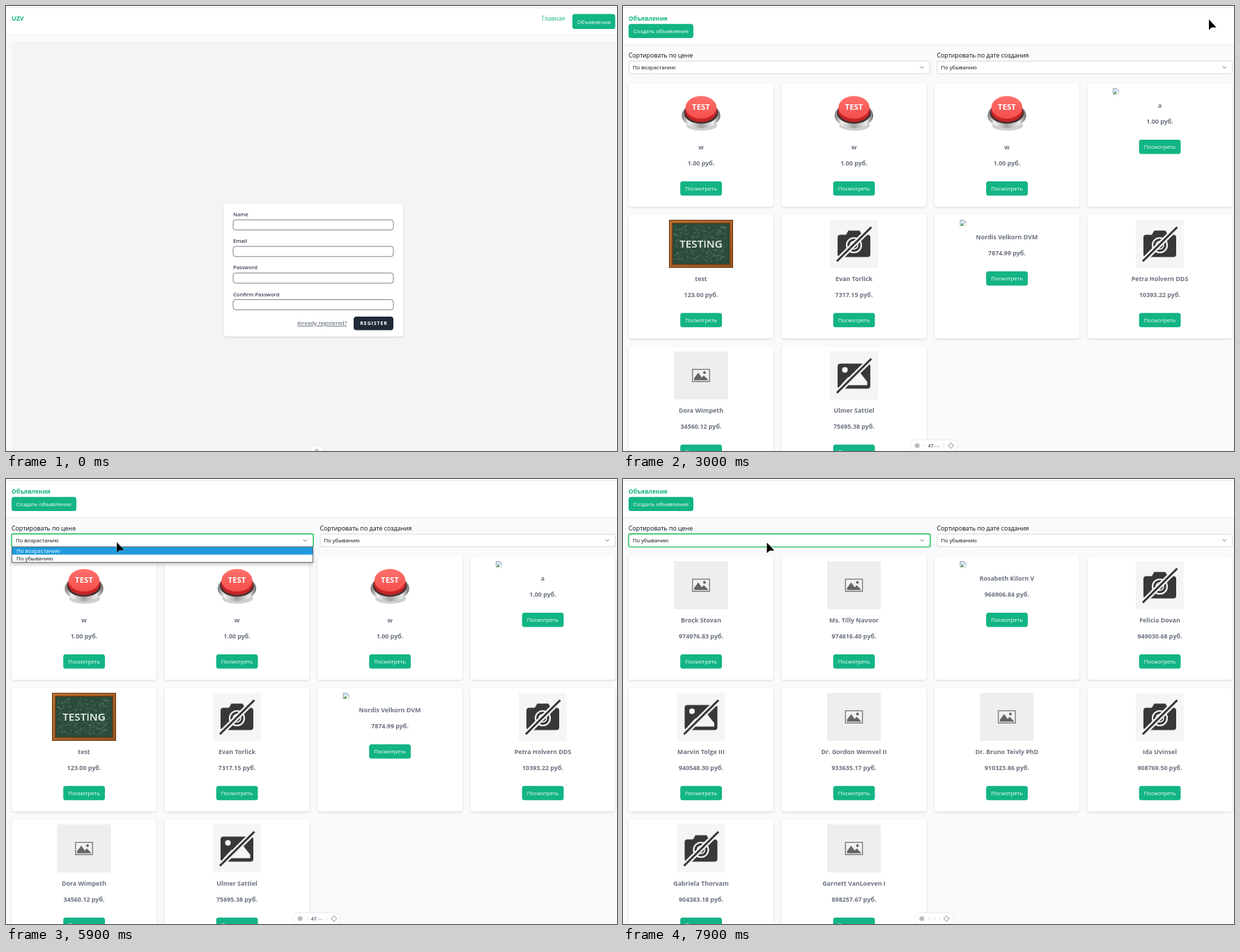
An HTML page that plays this animation: 877 by 639 pixels, repeating every 8000 ms.

```html
<!DOCTYPE html>
<html lang="ru">
<head>
<meta charset="utf-8">
<title>Объявления</title>
<style>
html, body { margin: 0; width: 100%; height: 100%; overflow: hidden; background: #f9fafb; }
svg { display: block; width: 877px; height: 639px; font-family: "Open Sans", "Noto Sans", sans-serif; }
.mid { text-anchor: middle; }
.bold { font-weight: 700; }
.card { fill: #fff; filter: drop-shadow(0 1.5px 1.5px rgba(0, 0, 0, .14)); }
.menu { filter: drop-shadow(0 3px 2.5px rgba(0, 0, 0, .25)); }
</style>
</head>
<body>
<svg id="stage" viewBox="0 0 877 639">
  <defs>
    <linearGradient id="chrome">
      <stop offset="0" stop-color="#777"/><stop offset=".18" stop-color="#f2f2f2"/>
      <stop offset=".5" stop-color="#a0a0a0"/><stop offset=".82" stop-color="#ececec"/>
      <stop offset="1" stop-color="#666"/>
    </linearGradient>
    <linearGradient id="dome" x2="0" y2="1">
      <stop offset="0" stop-color="#ff716b"/><stop offset="1" stop-color="#f54e4c"/>
    </linearGradient>
    <linearGradient id="wood" x2="1" y2="1">
      <stop offset="0" stop-color="#bb6f2f"/><stop offset="1" stop-color="#99541f"/>
    </linearGradient>
  </defs>
</svg>
<script>
const LOOP = 8000;
const GREEN = '#13b485', INK = '#0b0d12', GRAY = '#6b7280', DARK = '#383838', PALE = '#f5f5f5';

const rect = (x, y, w, h, fill, r = 0, extra = '') =>
  `<rect x="${x}" y="${y}" width="${w}" height="${h}" rx="${r}" fill="${fill}" ${extra}/>`;
const oval = (x, y, rx, ry, fill, extra = '') =>
  `<ellipse cx="${x}" cy="${y}" rx="${rx}" ry="${ry}" fill="${fill}" ${extra}/>`;
const path = (d, fill, extra = '') => `<path d="${d}" fill="${fill}" ${extra}/>`;
const text = (x, y, size, fill, str, extra = '') =>
  `<text x="${x}" y="${y}" font-size="${size}" fill="${fill}" ${extra}>${str}</text>`;
const group = (id, body) => `<g id="${id}">${body}</g>`;
const at = (x, y, body) => `<g transform="translate(${x} ${y})">${body}</g>`;
const stroke = (color, width) => `stroke="${color}" stroke-width="${width}"`;
const button = (x, y, w, h, label, base) =>
  rect(x, y, w, h, GREEN, 3.5) + text(x + w / 2, base, 7.8, '#fff', label, 'class="mid"');

// Pictures, drawn around the centre of a 69 px high slot
const slash = path('M-25 25.5L25.5 -24.5', 'none', stroke(PALE, 7.5)) +
  path('M-24.5 25L25 -24', 'none', stroke(DARK, 3.1));

function chalkDoodles() {
  let seed = 7, d = '';
  const rnd = n => (seed = (seed * 16807) % 2147483647) / 2147483647 * n;
  for (let i = 0; i < 240; i++) {
    d += `M${rnd(74) - 39} ${rnd(52) - 26}q${rnd(4)} ${rnd(8) - 4} ${rnd(4)} ${rnd(4) - 2}`;
  }
  return path(d, 'none', stroke('#62826f', .6));
}

const art = {
  knob: () =>
    oval(1, 19, 22, 7.5, '#cfcfcf') + oval(0, 4.5, 27.7, 18.5, 'url(#chrome)') +
    oval(0, 1, 24.5, 15.5, '#4a3232') + oval(0, -2, 22.8, 16, '#c62426') +
    oval(0, -7, 22.2, 16.3, 'url(#dome)') +
    text(0, -4, 11.4, '#fff', 'TEST', 'class="mid bold"'),
  board: () =>
    rect(-46, -34.5, 92, 69, 'url(#wood)') +
    rect(-45.5, -34, 91, 68, 'none', 0, stroke('#6b3813', 1)) +
    rect(-41, -29.5, 82, 59, '#2b4b3c', 0, stroke('#5a3012', 1)) + chalkDoodles() +
    text(0, 5.5, 15.2, '#eef3ee', 'TESTING', 'class="mid" font-weight="600"'),
  camera: () =>
    rect(-34.5, -34.5, 69, 69, PALE) + rect(-23.5, -13, 47, 32, DARK, 4) +
    path('M-12 -12L-8 -19H8L12 -12Z', DARK) +
    oval(0, 2, 10.5, 10.5, DARK, stroke(PALE, 2.2)) +
    oval(0, 2, 5.5, 5.5, 'none', stroke(PALE, 1.5)) + slash,
  picture: () =>
    rect(-34.5, -34.5, 69, 69, PALE) + rect(-23.5, -17, 47, 36, DARK, 4) +
    oval(-13, -8, 4, 4, PALE) + path('M-19 14L-8 2L-2 7L8 -5L19 9V14Z', PALE) + slash,
  blank: () =>
    rect(-38.5, -34.5, 77, 69, '#eee') +
    rect(-12.2, -8.7, 24.4, 17.6, '#f1f1f1', 0, stroke('#6a6a6a', 1.2)) +
    path('M-10 7V4L-4 -4L1 3L4 0L10 6V7Z', '#666') + oval(5, -4, 2, 2, '#666'),
  broken: () => at(-67.5, -34.5,
    path('M.5 .5H6L8.5 3V8.5H.5Z', '#d6e5f8', stroke('#8a8f98', .8)) +
    path('M1 8L4 4.5L6 8Z', '#55a846') + path('M4 8.5L8.5 4V8.5Z', '#fff')),
};

function card([kind, name, price], i) {
  const lift = kind === 'broken' ? 59.7 : 0;
  return at(8 + 219.5 * (i % 4), 111 + 189 * Math.floor(i / 4),
    rect(0, 0, 208, 177.5, '#fff', 4, 'class="card"') +
    at(104, 41.5, art[kind]()) +
    text(104, 94.5 - lift, 8.9, GRAY, name, 'class="mid bold"') +
    text(104, 117.7 - lift, 8.9, GRAY, price + ' руб.', 'class="mid bold"') +
    button(74.2, 140.7 - lift, 59.8, 20.5, 'Посмотреть', 154 - lift));
}

const cheapFirst = [
  ['knob', 'w', '1.00'], ['knob', 'w', '1.00'], ['knob', 'w', '1.00'], ['broken', 'a', '1.00'],
  ['board', 'test', '123.00'], ['camera', 'Evan Torlick', '7317.15'],
  ['broken', 'Nordis Velkorn DVM', '7874.99'], ['camera', 'Petra Holvern DDS', '10393.22'],
  ['blank', 'Dora Wimpeth', '34560.12'], ['picture', 'Ulmer Sattiel', '75695.38'],
];
const dearFirst = [
  ['blank', 'Brock Stovan', '974976.83'], ['blank', 'Ms. Tilly Navoor', '974616.40'],
  ['broken', 'Rosabeth Kilorn V', '966906.84'], ['camera', 'Felicia Dovan', '949030.68'],
  ['picture', 'Marvin Tolge III', '940548.30'], ['blank', 'Dr. Gordon Wemvel II', '933635.17'],
  ['blank', 'Dr. Bruno Teivly PhD', '910323.86'], ['camera', 'Ida Uvinsel', '908769.50'],
  ['camera', 'Gabriela Thorvam', '904383.18'], ['blank', 'Garnett VanLoeven I', '898257.67'],
];

const topLine = rect(0, 2, 877, 1, '#e5e7eb');

const field = (label, i) =>
  text(326, 302 + 38.2 * i, 7.55, '#374151', label, 'font-weight="600"') +
  rect(326, 307 + 38.2 * i, 230, 14.6, '#fff', 3.5, stroke(GRAY, .9));

const registerPage = group('register',
  rect(0, 0, 877, 639, '#f9fafb') + rect(0, 0, 877, 42, '#fff') + topLine +
  rect(0, 41.5, 877, 1, '#eceef1') + rect(8, 51, 867, 588, '#f3f4f6') +
  text(8, 21, 8.8, GREEN, 'UZV', 'class="bold"') +
  text(769, 21, 8.5, GREEN, 'Главная') +
  button(813, 11.5, 61.5, 21.5, 'Объявления', 25.5) +
  rect(312.3, 284, 258, 190.5, '#fff', 5, 'class="card"') +
  ['Name', 'Email', 'Password', 'Confirm Password'].map(field).join('') +
  text(418, 458.3, 8, '#4b5563', 'Already registered?', 'text-decoration="underline"') +
  rect(499, 446, 57, 19.5, '#1f2937', 4) +
  text(508.3, 458, 7, '#fff', 'REGISTER', 'class="bold" letter-spacing=".9"') +
  oval(446, 640, 9, 9, '#fff', stroke('#e8eaed', .8)) + oval(446, 638, 2.5, 2.5, '#c4c7cb'));

const select = (x, w, body) =>
  rect(x + .4, 79.2, w - .8, 18, '#fff', 2, stroke('#d1d5db', .9)) + body +
  path(`M${x + w - 14.5} 86.7l2.7 2.7l2.7 -2.7`, 'none', stroke(GRAY, 1));

const option = (y, label, on) =>
  (on ? rect(8.5, y, 432, 10.9, '#1f9bde') : '') +
  text(15, y + 8.2, 7.85, on ? '#fff' : INK, label);
const menu = (id, picked) => group(id,
  rect(8.5, 97.5, 432, 22, '#fff', 0, 'class="menu"') +
  option(97.7, 'По возрастанию', picked === 0) + option(108.6, 'По убыванию', picked === 1) +
  rect(8.5, 97.4, 432, 22.3, 'none', 0, stroke('#5c6066', .9)));

const listPage = group('list',
  rect(0, 0, 877, 639, '#f9fafb') + rect(0, 0, 877, 56, '#fff') + topLine +
  rect(0, 55.5, 877, 1, '#e5e7eb') +
  text(8, 21, 8.5, GREEN, 'Объявления', 'class="bold"') +
  button(8, 25.8, 93, 20.2, 'Создать объявление', 39) +
  text(8, 74, 8.8, INK, 'Сортировать по цене') +
  text(450.5, 74, 8.8, INK, 'Сортировать по дате создания') +
  select(8, 433,
    group('priceUp', text(14, 91, 7.7, INK, 'По возрастанию')) +
    group('priceDown', text(14, 91, 7.7, INK, 'По убыванию'))) +
  select(450.5, 424.5, text(456.5, 91, 7.7, INK, 'По убыванию')) +
  group('focus', rect(8, 78.8, 433.2, 18.8, 'none', 2.5, stroke('#22c55e', 1.4))) +
  group('cheap', cheapFirst.map(card).join('')) +
  group('dear', dearFirst.map(card).join('')) +
  menu('menuUp', 0) + menu('menuDown', 1));

const pill = (id, half, middle) => group(id, at(446.3, 631.3,
  rect(-half, -8.3, half * 2, 16.6, '#fff', 8.3, stroke('#e5e7eb', .9)) +
  oval(10.5 - half, 0, 3.5, 3.5, '#b9bdc2') +
  rect(20.7 - half, -2.5, .8, 5, '#d8dadd') + rect(half - 20.5, -2.5, .8, 5, '#d8dadd') + middle +
  oval(half - 10, 0, 3.2, 3.2, 'none', stroke('#a5a9ae', .9)) +
  path(`M${half - 10} -5v3.2m0 3.6v3.2m-5 -5h3.2m3.6 0h3.2`, 'none', stroke('#a5a9ae', .9))));

const status = group('status',
  path('M0 631.5H128Q130.5 631.5 130.5 634V639H0Z', '#dedede', stroke('#cfcfcf', .6)) +
  text(128.5, 641, 7.9, '#222', 'sort_by_price=asc&amp;sort_by_created_at=desc', 'text-anchor="end"'));

const cursor = group('cursor',
  group('arrow', path('M0 -.8V14.6L4 10.8H10.7Z', '#000', stroke('#fff', .6) + ' paint-order="stroke"')) +
  group('hand', path('M-1 1Q.3 -.8 1.6 1V5L6.5 6.3Q8.5 7 8.3 9.2L7 13.7H.3L-4 9.2Q-3.3 7 -1 8.4Z',
    '#000', stroke('#fff', .8))));

const stage = document.getElementById('stage');
stage.insertAdjacentHTML('beforeend', registerPage + listPage +
  pill('pillIdle', 28, oval(1, 0, .6, .6, '#999')) +
  pill('pillTime', 34.5,
    text(-8.5, 2.5, 6.8, GRAY, '47', 'class="bold"') + text(.7, 2.3, 5.5, '#b4b7bc', 'ms')) +
  status + cursor);

// Each step is [ms, value]; values hold until the next step.
function play(id, prop, steps) {
  const frames = steps.map(([ms, value]) => ({ offset: ms / LOOP, [prop]: value, easing: 'steps(1, end)' }));
  frames.push({ offset: 1, [prop]: steps[steps.length - 1][1] });
  document.getElementById(id).animate(frames, { duration: LOOP, iterations: Infinity });
}
const fade = (id, ...steps) => play(id, 'opacity', [[0, 0], ...steps]);

play('register', 'opacity', [[0, 1], [2600, 0]]);
fade('list', [2600, 1]);
fade('status', [1400, .6], [1500, 1], [2600, 0]);
fade('pillIdle', [2700, 1], [3000, 0], [7000, 1]);
play('pillIdle', 'transform', [
  [0, 'translate(0px, 6px)'], [2800, 'translate(0px, 3px)'], [2900, 'translate(0px, 0px)']]);
fade('pillTime', [3000, 1], [7000, 0]);
fade('focus', [5900, 1]);
fade('menuUp', [5900, 1], [6400, 0]);
fade('menuDown', [6400, 1], [6900, 0]);
play('priceUp', 'opacity', [[0, 1], [6900, 0]]);
fade('priceDown', [6900, 1]);
play('cheap', 'opacity', [[0, 1], [7000, 0]]);
fade('dear', [7000, 1]);
fade('cursor', [500, 1]);
play('arrow', 'opacity', [[0, 1], [900, 0], [2400, 1]]);
fade('hand', [900, 1], [2400, 0]);

const moves = [
  [0, 538, 84], [500, 538, 84], [600, 622, 70], [700, 715, 54], [800, 792, 40],
  [900, 840, 29], [1000, 860, 24], [1100, 848, 21], [1200, 841, 20],
  [3900, 800, 10], [4000, 655, 1], [4100, 450, 12], [4200, 270, 44],
  [4300, 162.5, 71], [4400, 150, 85], [4500, 142, 93], [4600, 140, 95.5],
  [4900, 151, 94], [5000, 159, 91.5],
  [6300, 156, 97], [6400, 149, 104], [6500, 143, 108.5], [6600, 140.5, 109],
  [7500, 147, 106], [7600, 164, 100], [7700, 184, 95], [7800, 199, 93], [7900, 206.5, 92],
];
play('cursor', 'transform', moves.map(([ms, x, y]) => [ms, `translate(${x}px, ${y}px)`]));
</script>
</body>
</html>
```
